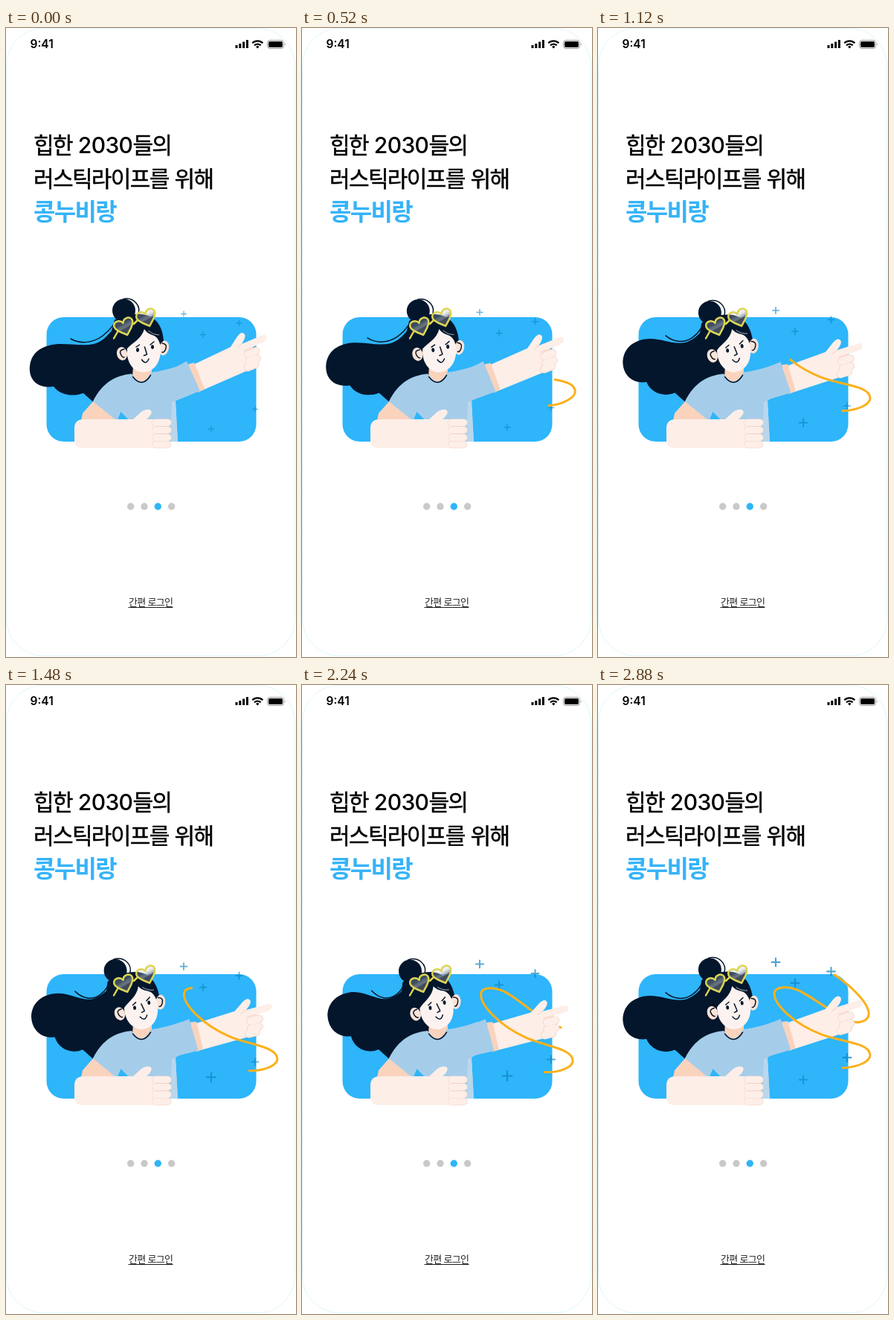
These frames come from a looping animation (390 px wide and 844 px high, 2920 ms). An HTML page:

```html
<!DOCTYPE html>
<html lang="ko">
<head>
<meta charset="utf-8">
<style>
  html, body { margin: 0; width: 100%; height: 100%; overflow: hidden; background: #fff; }
  svg { display: block; width: 390px; height: 844px; }
  text { font-family: Inter, 'Noto Sans CJK KR', 'Noto Sans CJK', sans-serif; }
  .title { font-size: 30px; font-weight: 500; letter-spacing: -.055em; word-spacing: 1.5px; stroke: #000; stroke-width: .5; }
  .title tspan { letter-spacing: -.6px; stroke: none; }
  .name { font-size: 32px; font-weight: 700; letter-spacing: -.054em; fill: #35b3f8; }
  .ink { fill: none; stroke: #071426; stroke-width: 1.5; stroke-linecap: round; stroke-linejoin: round; }
  .hair { fill: #03162c; }
  .skin { fill: #fdeee8; }
  .shade { fill: #fad3bd; }
  .shirt { fill: #a5cde9; }
  .crease { fill: none; stroke: #f6d2c2; stroke-linecap: round; }
  .finger { fill: none; stroke: #fdeee8; stroke-linecap: round; }
  .ribbon { fill: none; stroke: #fbb01b; stroke-width: 3; stroke-linecap: round; }
</style>
</head>
<body>
<svg viewBox="0 0 390 844">
  <defs>
    <linearGradient id="lens" x1=".4" x2=".6" y2="1">
      <stop offset=".25" stop-color="#c3cbd3" stop-opacity=".3"/>
      <stop offset=".5" stop-color="#8b949f" stop-opacity=".75"/>
      <stop offset=".6" stop-color="#414b5b"/>
    </linearGradient>
    <path id="heart" d="M0 11C-5 6-13 1-13-5C-13-12-3-13 0-6C3-13 13-12 13-5C13 1 5 6 0 11Z"/>
    <path id="fist" d="M325 438L336 433.5M327 447.5L337.5 443.5M325 455.5L335 451.5"/>
    <path id="grip" d="M201 529.5H217.5M201 539.5H217.5M201 549.5H217.5M201 559H217.5"/>
  </defs>

  <rect x=".5" y=".5" width="388" height="842" rx="50" fill="#fff" stroke="#b9eefa" stroke-dasharray="1 1"/>

  <!-- status bar -->
  <text x="32.5" y="27" font-size="15.5" font-weight="600">9:41</text>
  <path d="M310 27v-4M314.8 27v-6M319.6 27v-8.5M324.4 27v-11" stroke="#000" stroke-width="3"/>
  <g fill="none" stroke="#000" stroke-width="2.3">
    <path d="M331.3 20.3a10 10 0 0 1 14 0M334 23.3a6.2 6.2 0 0 1 8.6 0"/>
    <path d="M338.3 27.5l-2.2-2.3a3 3 0 0 1 4.4 0z" fill="#000" stroke="none"/>
  </g>
  <rect x="351.5" y="16.5" width="22" height="11" rx="3.5" fill="none" stroke="#000" stroke-opacity=".4"/>
  <rect x="353" y="18" width="19" height="8" rx="2"/>
  <path d="M375 20.2q1.5 1.8 0 3.6z" opacity=".5"/>

  <text class="title" x="37" y="167.5">힙한 <tspan>2030</tspan>들의</text>
  <text class="title" x="37" y="212.5">러스틱라이프를 위해</text>
  <text class="name" x="37" y="257.5">콩누비랑</text>

  <rect x="54.5" y="388" width="282" height="167" rx="23" fill="#2eb5fa"/>
  <g id="stars" fill="none" stroke="#0d83c3"></g>

  <path id="tail" class="hair"/>
  <path id="strand" class="ink"/>

  <path class="shade" d="M118 500L103 517L100 532L150 532L152 520Z"/>
  <path class="shade" d="M171 453L196 448L196 464Q184 482 170 469Z"/>
  <path class="shirt" d="M117 501C130 475 148 466 169 464Q184 485 195 462C212 460 224 456 236 452L246 489L228 500L231 555H150L150 528Z"/>
  <path d="M223 502L228 500L231 555H221Z" fill="#b9d7ec"/>
  <path d="M154.5 515L149 528L166 527Z" fill="#2eb5fa"/>
  <path class="ink" d="M170.5 468Q183 484 194.5 466" stroke-width="1"/>

  <g id="head">
    <circle class="hair" cx="158.500" cy="379" r="15.500"/>
    <path class="ink" d="M158 363.500C172 361 183 373 177 386"/>
    <path class="hair" d="M146 392C155 385 175 382 188 385C203 389 211 402 212 420L204 432L167 456L150 455L130 432C140 420 142 405 146 392Z"/>
    <g fill="#fbe3d7">
      <ellipse cx="156" cy="437" rx="7" ry="9" transform="rotate(-12 156 437)"/>
      <ellipse cx="212.5" cy="429.5" rx="6.5" ry="10" transform="rotate(12 212.5 429.5)"/>
    </g>
    <path class="ink" d="M159 431Q152 432 154 437T159 442M210 423Q217 424 215 430T210 435" stroke-width="1.2"/>
    <path fill="#fcf3f1" d="M163 430C161 446 170 462 185 462C200 461 208 448 208 432C208 422 204 414 197 412C191 410 188 407 186 404C182 418 170 422 163 430Z"/>
    <path d="M191 406Q198 412 206 412" fill="none" stroke="#c9d0d8" stroke-width=".8"/>
    <path class="ink" d="M175 428L179.5 425M194 425L199 421M186.5 428L189.5 438L185.5 439.5M182.5 445Q188 453 192 444"/>
    <ellipse class="hair" cx="177" cy="432" rx="2" ry="2.8"/>
    <ellipse class="hair" cx="197" cy="428" rx="2" ry="2.8"/>
  </g>

  <g fill="url(#lens)" stroke="#ddd553" stroke-width="2.5" stroke-linejoin="round">
    <path d="M151 406L145 416.5M172 397L177 392" stroke-linecap="round"/>
    <use href="#heart" transform="translate(159.5 401.5) rotate(-20)"/>
    <use href="#heart" transform="translate(189.5 389.5) rotate(-20)"/>
  </g>

  <g class="loop"><path class="ribbon" d="M241 415C241 404 262 404 280 416C300 429 315 444 338 457C352 464 366 459 366 449C366 434 342 408 321 393"/></g>

  <g id="arm">
    <path class="skin" d="M245 455L302 428L311 414Q317 406 321 411Q323 415 317 424L344 412.5Q350 410 350.5 415Q351 419 346 421.5L332 428L336 450L324 460L262 487Z"/>
    <use href="#fist" class="crease" stroke-width="10.8"/>
    <use href="#fist" class="finger" stroke-width="9.4"/>
    <path class="crease" d="M317 424L311 430M332 428L320 433"/>
    <path class="shade" d="M245 451L253 449L267 484L259 489Z"/>
    <path class="shirt" d="M243 447L261 487L229 500L208 482L214 463Z"/>
  </g>

  <g class="loop"><path class="ribbon" d="M326 520C345 521 364 514 364 505C364 488 325 485 300 473C262 455 240 428 241 415"/></g>

  <path class="skin" d="M105 525H171L182 515Q192 509 195.5 514Q197 518 189 525H210V563.5H101Q92 563 92 554V537Q92 525 105 525Z"/>
  <use href="#grip" class="crease" stroke-width="10"/>
  <use href="#grip" class="finger" stroke-width="9"/>

  <g fill="#c9c9c9">
    <circle cx="167.700" cy="642" r="4.700"/>
    <circle cx="186" cy="642" r="4.700"/>
    <circle cx="204.300" cy="642" r="4.700" fill="#2eb5fa"/>
    <circle cx="222.600" cy="642" r="4.700"/>
  </g>
  <text x="165" y="775" font-size="13" letter-spacing="-.7" fill="#222">간편 로그인</text>
  <path d="M164.5 777.5H224.5" stroke="#222"/>
</svg>
<script>
const LOOP = 2920, STEP = 40, DRAW = 2900, SWING = 9.5;
const $ = s => document.querySelector(s);
const [backLine, frontLine] = document.querySelectorAll('.ribbon');
const backLen = backLine.getTotalLength(), frontLen = frontLine.getTotalLength();

// hair outlines at rest and fully blown up
const TAIL = [
  'M165 392C142 395 141 418 118 424C100 428 75 421 58 426C38 431 31 445 32 460C33 475 46 484 64 481C73 493 90 495 104 490L122 506L175 482L180 420Z',
  'M165 395C138 396 139 415 115 421C98 423 85 409 64 412C44 415 34 429 34.500 444C36 462 49 473 66 471C70 488 88 496 103 489L122 506L175 482L180 420Z',
];
const STRAND = [
  'M87 417C101 425 118 422 130 413S142 400 148 394',
  'M94 410C104 421 116 423 126 416S134 405 140 398',
];

const stars = [[239, 383.5], [265, 411.5], [313.5, 396], [335, 511.5], [276, 538]].map(([x, y]) => {
  const el = document.createElementNS('http://www.w3.org/2000/svg', 'path');
  $('#stars').append(el);
  return { el, x, y };
});

function morph(el, [from, to], k) {
  const ends = to.match(/[\d.]+/g);
  let i = 0;
  el.setAttribute('d', from.replace(/[\d.]+/g, n => +n + (ends[i++] - n) * k));
}

function turn(el, deg, x, y) {
  el.setAttribute('transform', `rotate(${deg} ${x} ${y})`);
}

function reveal(path, len, shown) {
  const d = Math.max(0, Math.min(len, shown));
  path.style.display = d ? '' : 'none';
  path.style.strokeDasharray = `${d} ${len + 10}`;
}

function drawStars(t, sway) {
  stars.forEach(({ el, x, y }, i) => {
    const swaying = i === 4;
    const k = swaying ? sway : t / LOOP;
    const r = 4 + k * (swaying ? 3.3 : 2.3);
    const cy = y - k * (swaying ? 14 : 11.7);
    el.setAttribute('d', `M${x - r} ${cy}h${2 * r}M${x} ${cy - r}v${2 * r}`);
    el.setAttribute('stroke-width', 1.3 + k * .9);
    el.setAttribute('opacity', .6 + k * .12);
  });
}

function frame(now) {
  const t = Math.floor(now % LOOP / STEP) * STEP;
  const sway = (1 - Math.cos(Math.PI * t / 2000)) / 2;
  morph($('#tail'), TAIL, sway);
  morph($('#strand'), STRAND, sway);
  turn($('#head'), -9.8 * sway, 183, 460);
  turn($('#arm'), SWING * sway, 235, 472);
  document.querySelectorAll('.loop').forEach(g => turn(g, SWING * (sway - 1), 235, 472));
  const shown = (frontLen + backLen) * t / DRAW;
  reveal(frontLine, frontLen, shown);
  reveal(backLine, backLen, shown - frontLen);
  drawStars(t, sway);
}

const start = performance.now();
(function tick() {
  frame(performance.now() - start);
  requestAnimationFrame(tick);
})();
</script>
</body>
</html>
```
